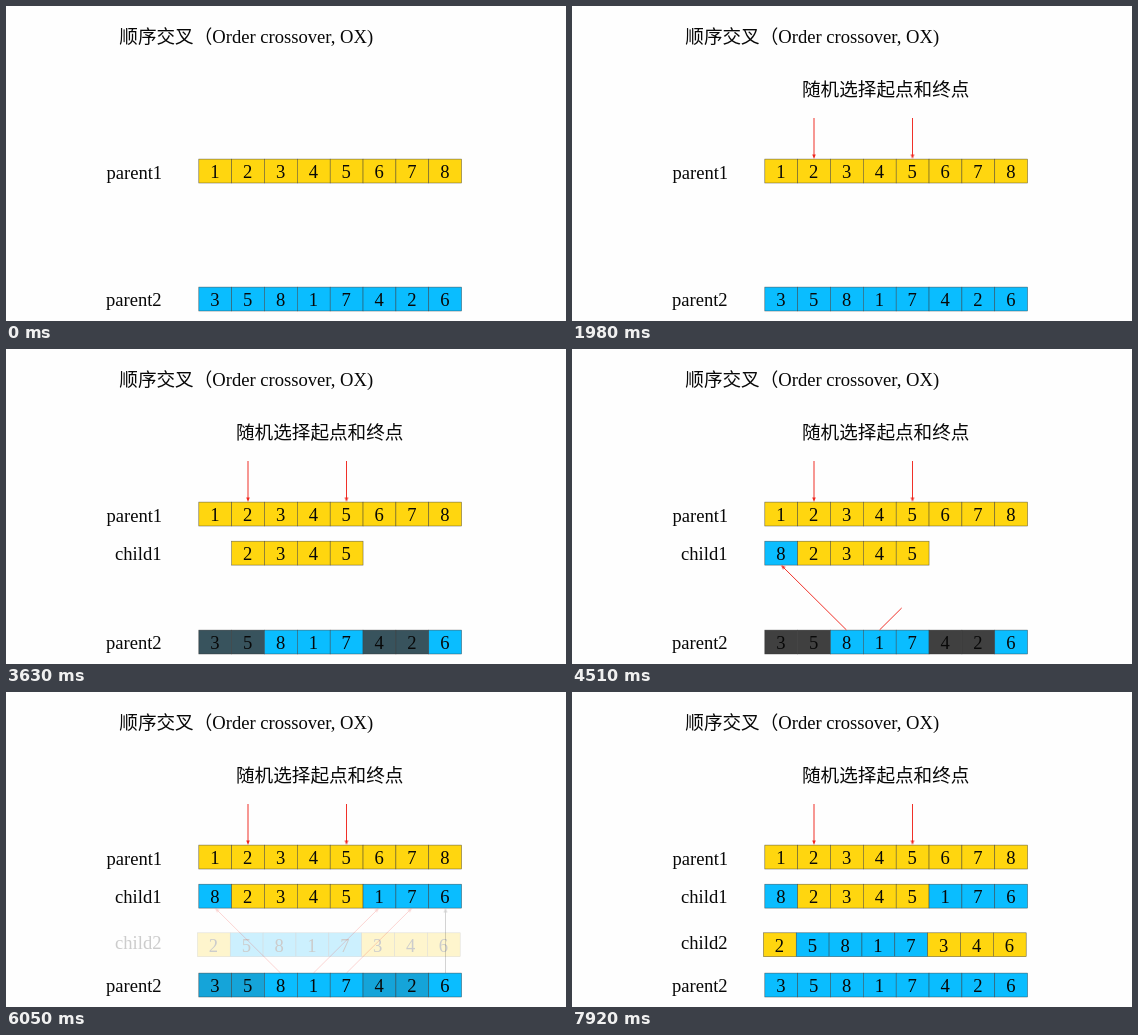
These frames come from a looping animation (560x315 px, 9.9 s). An HTML page:

```html
<!DOCTYPE html>
<html lang="zh-CN">
<head>
<meta charset="utf-8">
<title>Order crossover</title>
<style>
html, body { margin: 0; width: 100%; height: 100%; overflow: hidden; background: #fefefe; }
svg { display: block; width: 100%; height: 100%; }
text { font: 300 18.6px 'Liberation Serif', 'Noto Sans CJK SC', 'Noto Sans CJK', serif; fill: #080808; }
.num { font-size: 18.6px; text-anchor: middle; }
rect { stroke: #333; stroke-opacity: .75; stroke-width: .55; }
.y { fill: #ffd60f; }
.b { fill: #0abdff; }
.arrow { stroke: #f0261e; fill: #f0261e; }
.arrow.ink { stroke: #222; fill: #222; }
.shaft { stroke-width: .95; stroke-dasharray: 1 2; }
.tip { stroke: none; }

.anim, .shaft, .tip, .dim { animation: 9.9s step-end var(--d, 0s) infinite both; }
.hint { animation-name: hint; }
.marks { animation-name: marks; }
.marks .shaft { animation-name: drop; }
.marks .tip { animation-name: dropTip; }
.child1 { animation-name: child1; }
.links { animation-name: links; }
.links .shaft { animation-name: rise; }
.links .tip, .placed { animation-name: pop; }
.child2 { animation-name: child2; }
.dim { animation-name: dim; }

@keyframes hint {
  0% { opacity: 0; }
  2.222% { opacity: 0; animation-timing-function: steps(5, start); }
  7.777%, 100% { opacity: 1; }
}
@keyframes marks { 0% { opacity: 0; } 8.888%, 100% { opacity: 1; } }
@keyframes drop {
  0% { stroke-dashoffset: 1.05; }
  8.888% { stroke-dashoffset: 1; animation-timing-function: steps(5, start); }
  14.444%, 100% { stroke-dashoffset: 0; }
}
@keyframes dropTip { 0% { opacity: 0; } 13.333%, 100% { opacity: 1; } }
@keyframes child1 {
  0% { opacity: 0; }
  21.111% { opacity: 0; animation-timing-function: steps(5, start); }
  26.666%, 100% { opacity: 1; }
}
@keyframes dim {
  0% { fill: #0abdff; }
  29.999% { fill: rgb(12, 184, 247); }
  31.111% { fill: rgb(16, 174, 232); animation-timing-function: steps(5); }
  36.666% { fill: rgb(56, 83, 93); animation-timing-function: steps(2); }
  38.888% { fill: #404040; }
  57.777% { fill: #404040; animation-timing-function: steps(5, start); }
  63.333%, 100% { fill: #0abdff; }
}
@keyframes rise {
  0% { stroke-dashoffset: 1.05; }
  41.111% { stroke-dashoffset: .65; }
  42.222% { stroke-dashoffset: .28; }
  43.333%, 100% { stroke-dashoffset: 0; }
}
@keyframes pop { 0% { opacity: 0; } 43.333%, 100% { opacity: 1; } }
@keyframes links {
  0% { opacity: 0; }
  41.111% { opacity: 1; }
  57.777% { opacity: 1; animation-timing-function: steps(5, start); }
  63.333%, 100% { opacity: 0; }
}
@keyframes child2 {
  0% { opacity: 0; }
  61.111% { opacity: 0; animation-timing-function: steps(5, start); }
  66.666%, 100% { opacity: 1; }
}
</style>
</head>
<body>
<svg viewBox="0 0 560 315">
  <text x="113.3" y="36.8">顺序交叉（Order crossover, OX)</text>
  <text class="anim hint" x="230" y="89.6">随机选择起点和终点</text>
  <g id="parent1"><text x="100.4" y="173">parent1</text></g>
  <g id="child1" class="anim child1"><text x="109" y="210.6">child1</text></g>
  <g id="child2" class="anim child2"><text x="109" y="256.6">child2</text></g>
  <g id="parent2"><text x="99.9" y="299.6">parent2</text></g>
  <g id="marks" class="anim marks"></g>
  <g id="links" class="anim links"></g>
</svg>
<script>
const CELL = 32.85, GAP = 0.44;
const byId = id => document.getElementById(id);

function add(parent, tag, attrs, text) {
  const el = document.createElementNS('http://www.w3.org/2000/svg', tag);
  for (const k in attrs) el.setAttribute(k, attrs[k]);
  if (text) el.textContent = text;
  return parent.appendChild(el);
}

// colors: y or b per cell, B for a blue cell that dims
// placed: cell index -> turn in which it is filled
function row(id, x, y, digits, colors, placed = {}) {
  [...digits].forEach((d, i) => {
    const late = i in placed;
    const cell = add(byId(id), 'g', late ? { class: 'anim placed', style: `--d:${placed[i] * GAP}s` } : {});
    const left = x + i * CELL;
    const fill = colors[i] === 'B' ? 'b dim' : colors[i];
    add(cell, 'rect', { x: left, y, width: CELL, height: 23.9, class: fill });
    add(cell, 'text', { x: left + CELL / 2 - 0.4, y: y + 18.7, class: 'num' }, d);
  });
}

function arrow(id, x1, y1, x2, y2, delay, extra = '') {
  const g = add(byId(id), 'g', { class: 'arrow ' + extra, style: `--d:${delay}s` });
  const len = Math.hypot(x2 - x1, y2 - y1);
  const ux = (x2 - x1) / len, uy = (y2 - y1) / len;
  add(g, 'path', { class: 'shaft', pathLength: 1, d: `M${x1} ${y1}L${x2 - ux * 3} ${y2 - uy * 3}` });
  const angle = Math.atan2(uy, ux) * 180 / Math.PI;
  add(g, 'path', { class: 'tip', d: 'M0 0L-4.5 1.8V-1.8Z', transform: `translate(${x2} ${y2}) rotate(${angle})` });
}

row('parent1', 192.8, 153.1, '12345678', 'yyyyyyyy');
row('child1', 192.8, 192.2, '82345176', 'byyyybbb', { 0: 0, 5: 1, 6: 2, 7: 3 });
row('child2', 191.4, 240.8, '25817346', 'ybbbbyyy');
row('parent2', 192.8, 281.1, '35817426', 'BBbbBBBb'.replace('BBbbB', 'BBbbb'));

arrow('marks', 242, 112, 242, 153, 0);
arrow('marks', 340.5, 112, 340.5, 153, 0.66);

[[274.5, 209], [307.5, 373], [340.5, 406]].forEach(([from, to], i) =>
  arrow('links', from, 281, to, 216, i * GAP));
arrow('links', 439.5, 281, 439.5, 216, 3 * GAP, 'ink');
</script>
</body>
</html>
```
